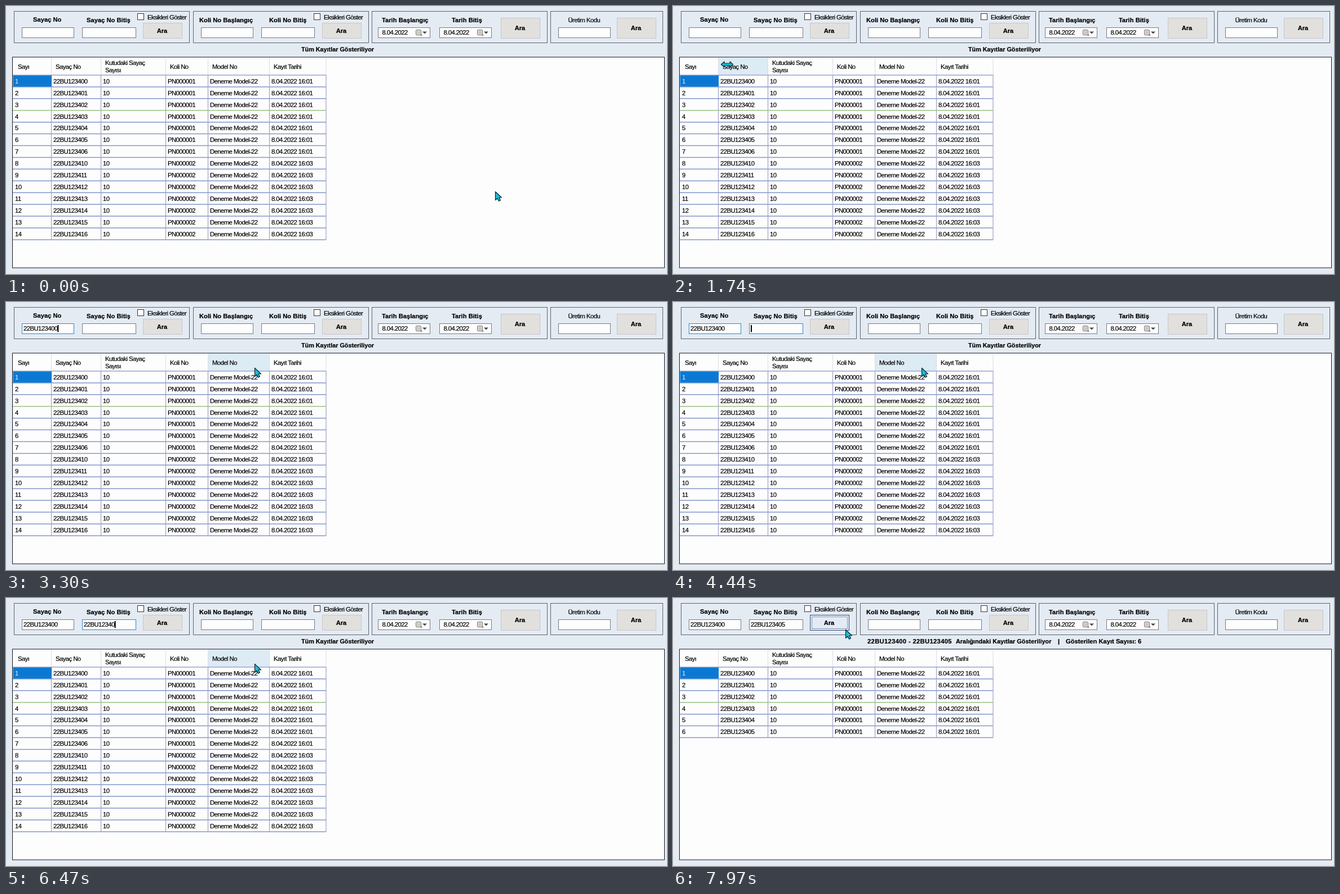
Recreate the animation shown at these times as an HTML page. Size 1173 by 477 pixels, loop 8 s.

```html
<!DOCTYPE html>
<html lang="tr">
<head>
<meta charset="utf-8">
<title>Kayıt arama</title>
<style>
  html, body { margin: 0; width: 100%; height: 100%; overflow: hidden; background: #e4ebf3; }
  svg { display: block; width: 100vw; height: 100vh; }
  text { font: 11.3px "Liberation Sans", Arial, sans-serif; letter-spacing: -.56px; fill: #000; stroke: #000; stroke-width: .2px; white-space: pre; }
  .bold { font-weight: bold; font-size: 11.2px; letter-spacing: 0; }
  .selected { fill: #e8f4ff; stroke: none; }
</style>
</head>
<body>
<svg id="stage" viewBox="0 0 1173 477" preserveAspectRatio="none"></svg>
<script>
const stage = document.getElementById('stage');
const LOOP = 8000;

function add(tag, attrs, parent = stage) {
  const el = document.createElementNS('http://www.w3.org/2000/svg', tag);
  for (const key in attrs) el.setAttribute(key, attrs[key]);
  parent.appendChild(el);
  return el;
}
const box = (x, y, width, height, fill, stroke = 'none', parent = stage) =>
  add('rect', { x, y, width, height, fill, stroke }, parent);
const line = (x1, y1, x2, y2, stroke, parent = stage, width = 1) =>
  add('line', { x1, y1, x2, y2, stroke, 'stroke-width': width }, parent);
function label(x, y, content, attrs = {}, parent = stage) {
  const el = add('text', { x, y, ...attrs }, parent);
  el.textContent = content;
  return el;
}
const bold = (x, y, content, attrs = {}, parent = stage) =>
  label(x, y, content, { class: 'bold', ...attrs }, parent);
const show = (el, on) => el.setAttribute('visibility', on ? 'visible' : 'hidden');

// Search panel
const GRAY = '#777b82', BLUE = '#2f86cf';
const field = (x, w) => box(x + .5, 38.5, w, 18, '#fdfdfd', GRAY);

function button(x, y, h) {
  const face = box(x + .5, y + .5, 69, h, '#e1e0dd', '#c6c7cb');
  bold(x + 34, y + h / 2 + 4.3, 'Ara', { 'text-anchor': 'middle' });
  return face;
}
function checkbox(x) {
  box(x + .5, 13.5, 11, 11, '#fdfdfd', '#33363c');
  label(x + 18, 23.7, 'Eksikleri Göster', { style: 'letter-spacing:-.62px' });
}
function datePicker(x) {
  field(x, 92);
  label(x + 7.5, 51.4, '8.04.2022');
  add('rect', { x: x + 67.5, y: 42.5, width: 9, height: 9, rx: 1.5, fill: '#e8e8e8', stroke: '#77716c' });
  for (let i = 0; i < 3; i++) line(x + 69, 45 + 2 * i, x + 75, 45 + 2 * i, '#aaa49d');
  add('path', { d: `M${x + 75} 53l3-3v3z`, fill: '#77716c' });
  add('path', { d: `M${x + 79} 45.5h8l-4 4z`, fill: '#44474d' });
}

for (const [x, w] of [[14, 311], [332, 311], [649, 311], [966, 199]])
  box(x + .5, 9.5, w, 56, 'none', '#5d626c');

bold(48, 28, 'Sayaç No');
[[143, 'Sayaç No Bitiş'], [343, 'Koli No Başlangıç'], [467, 'Koli No Bitiş'],
 [667, 'Tarih Başlangıç'], [791, 'Tarih Bitiş']].forEach(([x, s]) => bold(x, 29, s));
label(997.5, 29, 'Üretim Kodu');
checkbox(233);
checkbox(546);

const searchButton = button(243, 30, 27);
const focusRing = box(246.5, 33.5, 63, 21, 'none', '#8a92a6');
button(561, 30, 27);
button(878, 21, 36);
button(1084, 21, 36);

// "from" and "to" inputs share one typing model
const inputs = [
  { x: 28, w: 92, value: '22BU123400', focus: 2010, start: 2400, step: 94, blur: 4400 },
  { x: 135, w: 95, value: '22BU123405', focus: 4400, start: 4900, step: 180, blur: 7600 }
];
for (const input of inputs) {
  input.frame = field(input.x, input.w);
  input.text = label(input.x + 3, 51.4, '');
}
field(346, 92);
field(453, 94);
field(980, 92);
datePicker(660);
datePicker(769);
const caret = box(0, 41, 2, 12.5, '#000');

const allCaption = bold(524, 80.5, 'Tüm Kayıtlar Gösteriliyor', { style: 'font-size:10.8px' });
const rangeCaption = add('g', {});
bold(345, 80.5, '22BU123400 - 22BU123405', { style: 'letter-spacing:.35px' }, rangeCaption);
bold(502, 80.5, 'Aralığındaki Kayıtlar Gösteriliyor', { style: 'font-size:10.9px' }, rangeCaption);
bold(683, 80.5, '|', {}, rangeCaption);
bold(697, 80.5, 'Gösterilen Kayıt Sayısı: 6', {}, rangeCaption);

// Table
const edges = [12, 80.5, 168.5, 283.5, 358.5, 467.5, 568];
const TOP = 123, PITCH = 20.92;
box(11.5, 91, 1157, 375, '#fdfdfd', '#15171c');
const hover = box(0, 92, 0, 30.5, '#dcebf4');
['Sayı', 'Sayaç No', '', 'Koli No', 'Model No', 'Kayıt Tarihi']
  .forEach((s, i) => label(i ? edges[i] + 7.5 : 21, 112, s));
label(176, 105, 'Kutudaki Sayaç');
label(176, 118, 'Sayısı');
edges.slice(1).forEach(x => line(x, 92, x, TOP, '#dcdce2'));
line(12, TOP, 568, TOP, '#98a6d0', stage, 1.4);

const rows = Array.from({ length: 14 }, (_, i) => {
  const row = add('g', {});
  const top = TOP + i * PITCH, bottom = top + PITCH;
  const secondBox = i > 6;
  edges.slice(1).forEach(x => line(x, top, x, bottom, '#9ea2c6', row, 1.2));
  line(12, bottom, 568, bottom, i === 2 ? '#9cbf8c' : '#8497cc', row, 1.5);
  if (!i) box(12.5, 123.5, 68.5, 20, '#0b79d3', 'none', row);
  const cells = [i + 1, '22BU1234' + String(secondBox ? i + 3 : i).padStart(2, '0'), 10,
    secondBox ? 'PN000002' : 'PN000001', 'Deneme Model-22', '8.04.2022 16:0' + (secondBox ? 3 : 1)];
  cells.forEach((s, c) =>
    label(c ? edges[c] + 3.5 : 16, top + 14.8, s, i || c ? {} : { class: 'selected' }, row));
  return row;
});

// Pointer shapes, all drawn from the same top-left origin
const pointer = add('g', {});
const ink = { fill: '#19bdd8', stroke: '#0b2530', 'stroke-width': 1.2, 'stroke-linejoin': 'round' };
const shapes = {
  arrow: add('path', { d: 'M.5 .5V15.5L4 12.3L6.6 17.3L9.5 15.8L7 11H11.5Z', ...ink }, pointer),
  resize: add('path', { d: 'M1.5 8L7 3V6H17V3L22.5 8L17 13V10H7V13Z', ...ink }, pointer),
  beam: add('path', { d: 'M1 1H7M4 1V15M1 15H7', fill: 'none', stroke: '#0b2530', 'stroke-width': 1.2 }, pointer)
};

// Pointer stops: time, x, y
const stops = [
  [0, 868, 330], [900, 868, 330], [1640, 84, 96], [1760, 84, 96], [1960, 78, 44],
  [2060, 78, 44], [2450, 441, 117], [6750, 441, 117], [7350, 306, 56], [LOOP, 306, 56]
];
function pointerAt(t) {
  const i = stops.findIndex(s => s[0] > t);
  const [t0, x0, y0] = stops[i - 1], [t1, x1, y1] = stops[i];
  const p = (t - t0) / (t1 - t0), e = p * p * (3 - 2 * p);
  return [x0 + (x1 - x0) * e, y0 + (y1 - y0) * e];
}

const SEARCH = 7700;
function render(t) {
  const [x, y] = pointerAt(t);
  const inHeader = y >= 92 && y < TOP && x > 12 && x < 568;
  const column = inHeader ? edges.findIndex(e => e > x) - 1 : -1;
  const overField = y > 38 && y < 57 && inputs.some(f => x > f.x && x < f.x + f.w);
  const nearEdge = inHeader && edges.some(e => Math.abs(e - x) < 5);
  const shape = overField ? 'beam' : nearEdge ? 'resize' : 'arrow';
  for (const name in shapes) show(shapes[name], name === shape);
  pointer.setAttribute('transform', `translate(${x.toFixed(1)} ${y.toFixed(1)})`);

  show(hover, inHeader);
  if (inHeader) {
    hover.setAttribute('x', edges[column] + .5);
    hover.setAttribute('width', edges[column + 1] - edges[column] - 1);
  }

  show(caret, false);
  for (const f of inputs) {
    const typed = Math.max(0, Math.min(f.value.length, Math.floor((t - f.start) / f.step) + 1));
    const focused = t >= f.focus && t < f.blur;
    f.text.textContent = f.value.slice(0, typed);
    f.frame.setAttribute('stroke', focused || (t >= f.blur && t < f.blur + 120) ? BLUE : GRAY);
    if (focused) {
      const lastKey = typed ? f.start + (typed - 1) * f.step : f.focus;
      caret.setAttribute('x', f.x + 3 + f.text.getComputedTextLength());
      show(caret, (t - lastKey) % 1060 < 530);
    }
  }

  const overButton = x > 243 && x < 313 && y > 30 && y < 58;
  const pressed = t >= 7600;
  searchButton.setAttribute('fill', overButton ? '#e4ebf8' : '#e1e0dd');
  searchButton.setAttribute('stroke', pressed ? '#294f7c' : overButton ? BLUE : '#c6c7cb');
  show(focusRing, pressed);

  const filtered = t >= SEARCH;
  show(allCaption, !filtered);
  show(rangeCaption, filtered);
  rows.forEach((row, i) => show(row, !filtered || i < 6));
}

const begin = performance.now();
function tick() {
  render((performance.now() - begin) % LOOP);
  requestAnimationFrame(tick);
}
tick();
</script>
</body>
</html>
```
